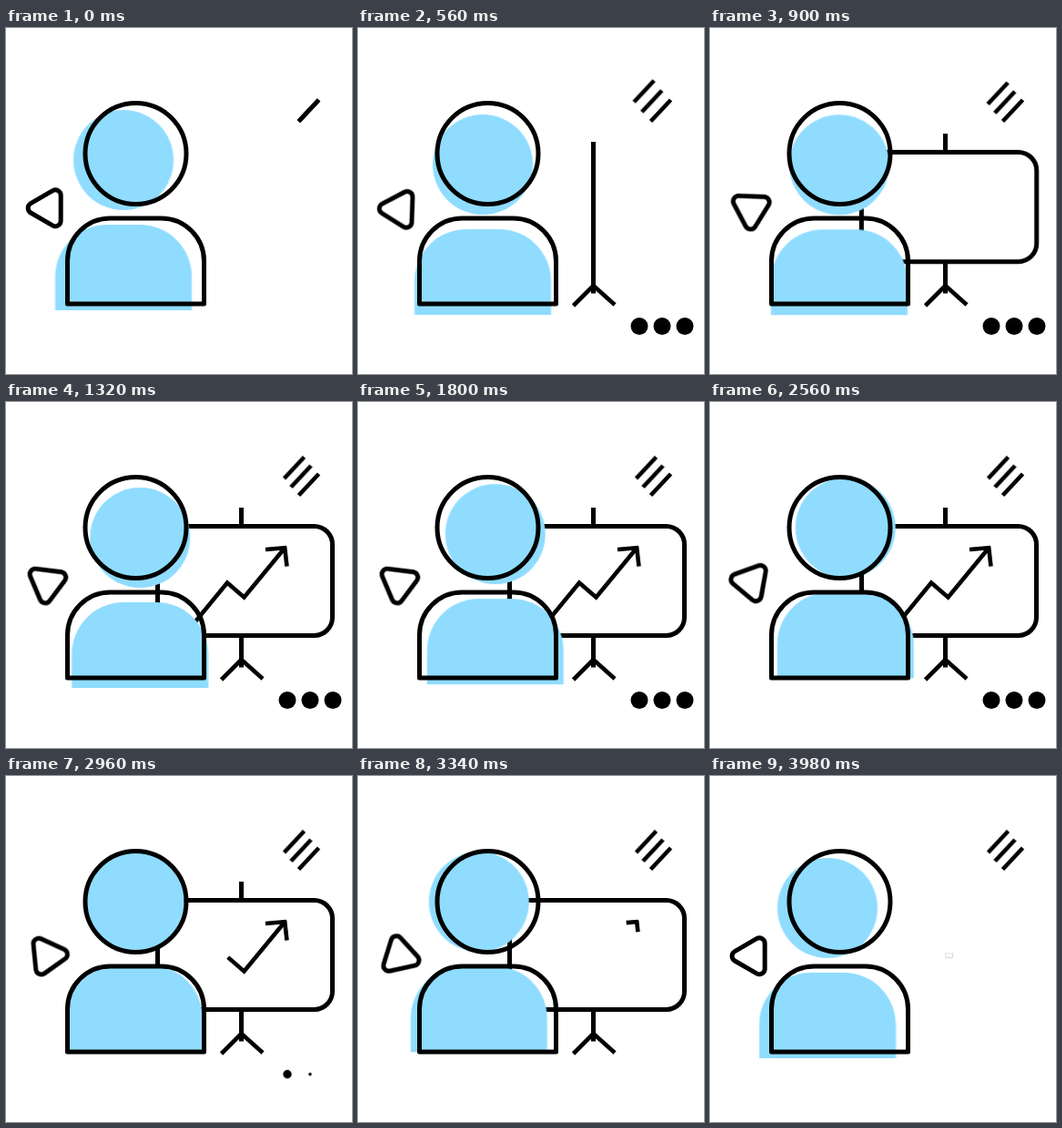
Recreate the animation shown at these times as an HTML page. Size 380 by 380 pixels, loop 4 s.

```html
<!DOCTYPE html>
<html lang="en">
<head>
<meta charset="utf-8">
<title>Presenter</title>
<style>
html, body { margin: 0; width: 100%; height: 100%; overflow: hidden; background: #fff; }
svg { display: block; width: 100vw; height: 100vh; }

.line { fill: none; stroke: #000; stroke-width: 5; stroke-linejoin: round; }
.thin { stroke-width: 4.6; }
.draw { stroke-dasharray: 1 2; }

.anim { animation: 4s linear infinite both; }

/* Stand */
.leg { animation-name: leg; }
.pole { animation-name: pole; }
.nub { animation-name: nub; }
@keyframes leg {
  0%, 1% { stroke-dashoffset: 1.05; }
  6%, 86% { stroke-dashoffset: 0; }
  94%, 100% { stroke-dashoffset: 1.05; }
}
@keyframes pole {
  0%, 3% { stroke-dashoffset: 1.05; }
  12.5%, 95% { stroke-dashoffset: 0; }
  99.3%, 100% { stroke-dashoffset: 1.05; }
}
@keyframes nub {
  0%, 12.5% { stroke-dashoffset: 1.05; }
  15%, 75% { stroke-dashoffset: 0; }
  82%, 100% { stroke-dashoffset: 1.05; }
}

/* Board */
.board { fill: #fff; transform-origin: 262.5px 197px; animation-name: board; }
@keyframes board {
  0%, 14.2% { transform: scale(0); animation-timing-function: ease-out; }
  24% { transform: scale(1.04); animation-timing-function: ease-in-out; }
  31.5%, 83.7% { transform: scale(1); animation-timing-function: ease-in-out; }
  95% { transform: scale(.12); }
  99.5% { transform: scale(.045); }
  100% { transform: scale(0); }
}
.trend { stroke-linejoin: miter; animation-name: trend; }
.tip { animation-name: tip; }
@keyframes trend {
  0%, 23% { stroke-dashoffset: 1.05; animation-timing-function: ease-in-out; }
  31%, 68% { stroke-dashoffset: 0; animation-timing-function: ease-in-out; }
  82%, 100% { stroke-dashoffset: -1.05; }
}
@keyframes tip {
  0%, 30.5% { stroke-dashoffset: 1.05; }
  33%, 81% { stroke-dashoffset: 0; }
  87.3%, 100% { stroke-dashoffset: 1.05; }
}

/* Blue fill drifting around the outline */
.fill { fill: #8fdcff; animation-name: drift; }
@keyframes drift {
  0% { transform: translate(-13.5px, 7px); }
  7% { transform: translate(-10.2px, 10px); }
  14% { transform: translate(-5.5px, 12px); }
  23.5% { transform: translate(0, 12.3px); }
  33% { transform: translate(4.7px, 11px); }
  41% { transform: translate(7.2px, 8.9px); }
  45% { transform: translate(8.3px, 7.1px); }
  50% { transform: translate(8.9px, 4.8px); }
  57% { transform: translate(8.6px, 2px); }
  64% { transform: translate(6.3px, .2px); }
  73.75% { transform: translate(-1.5px, -.7px); }
  83.5% { transform: translate(-9.7px, .2px); }
  90% { transform: translate(-12.6px, 3.8px); }
  95%, 100% { transform: translate(-13.5px, 7px); }
}

/* Triangle */
.tri { transform-origin: 45.5px 198.2px; animation-name: spin; }
@keyframes spin {
  0% { transform: rotate(0deg); animation-timing-function: cubic-bezier(.3, .2, .7, .85); }
  14% { transform: rotate(122deg); animation-timing-function: cubic-bezier(.15, .55, .4, 1); }
  31%, 54% { transform: rotate(157deg); animation-timing-function: cubic-bezier(.4, .1, .75, .8); }
  64% { transform: rotate(250deg); animation-timing-function: cubic-bezier(.25, .45, .6, .8); }
  83.5% { transform: rotate(317.5deg); animation-timing-function: cubic-bezier(.33, .45, .6, 1); }
  100% { transform: rotate(360deg); }
}

/* Strokes fanning out */
.fan { animation-name: fan; }
@keyframes fan {
  0% { transform: none; animation-timing-function: ease-out; }
  9% {
    transform: translate(calc(var(--x) * 1.28), calc(var(--y) * 1.28));
    animation-timing-function: cubic-bezier(.2, .4, .5, 1);
  }
  29%, 100% { transform: translate(var(--x), var(--y)); }
}

/* Dots */
.dot { transform-box: fill-box; transform-origin: center; }
.d1 { animation-name: dot1; }
.d2 { animation-name: dot2; }
.d3 { animation-name: dot3; }
@keyframes dot1 {
  0%, 2% { transform: scale(0); }
  8%, 70% { transform: scale(1); }
  78%, 100% { transform: scale(0); }
}
@keyframes dot2 {
  0%, 5% { transform: scale(0); }
  11%, 67.5% { transform: scale(1); }
  75.5%, 100% { transform: scale(0); }
}
@keyframes dot3 {
  0%, 8% { transform: scale(0); }
  14%, 64.5% { transform: scale(1); }
  72.5%, 100% { transform: scale(0); }
}
</style>
</head>
<body>
<svg viewBox="0 0 380 380">
  <path class="line thin draw anim leg" pathLength="1" d="M259 282.500L236.500 305"/>
  <path class="line thin draw anim leg" pathLength="1" d="M258 282.500L282 304"/>
  <path class="line draw anim pole" pathLength="1" d="M258.500 291.500V137"/>
  <path class="line draw anim nub" pathLength="1" d="M258.500 138V116"/>

  <rect class="line anim board" x="166.500" y="136.500" width="192" height="120" rx="20"/>
  <path class="line thin draw anim trend" pathLength="1" d="M204 246L243 198.500L261.500 214.500L306 160.500"/>
  <path class="line thin draw anim tip" pathLength="1" d="M308 160L285 162"/>
  <path class="line thin draw anim tip" pathLength="1" d="M306 158.500L308.500 180.500"/>

  <g class="anim fill">
    <circle cx="142.500" cy="138" r="55"/>
    <path d="M67.500 303V266a57 57 0 0 1 57-57H160.500a57 57 0 0 1 57 57V303Z"/>
  </g>
  <g class="line">
    <circle cx="142.500" cy="138" r="55.500"/>
    <path d="M67.500 303V256a47 47 0 0 1 47-47H170.500a47 47 0 0 1 47 47V303Z"/>
  </g>

  <path class="line anim tri" d="M60.200 211.700a6 6 0 0 1-9 5.200L27.200 203a6 6 0 0 1 0-10.400L51.200 178.700a6 6 0 0 1 9 5.200Z"/>

  <path class="line thin anim fan" style="--x:-16px;--y:-18.500px" d="M321.500 102.500L343.500 79"/>
  <path class="line thin anim fan" style="--x:-8.500px;--y:-9px" d="M321.500 102.500L343.500 79"/>
  <path class="line thin" d="M321.500 102.500L343.500 79"/>

  <circle class="anim dot d1" cx="309" cy="327.500" r="9.500"/>
  <circle class="anim dot d2" cx="334" cy="327.500" r="9.500"/>
  <circle class="anim dot d3" cx="359" cy="327.500" r="9.500"/>
</svg>
</body>
</html>
```
